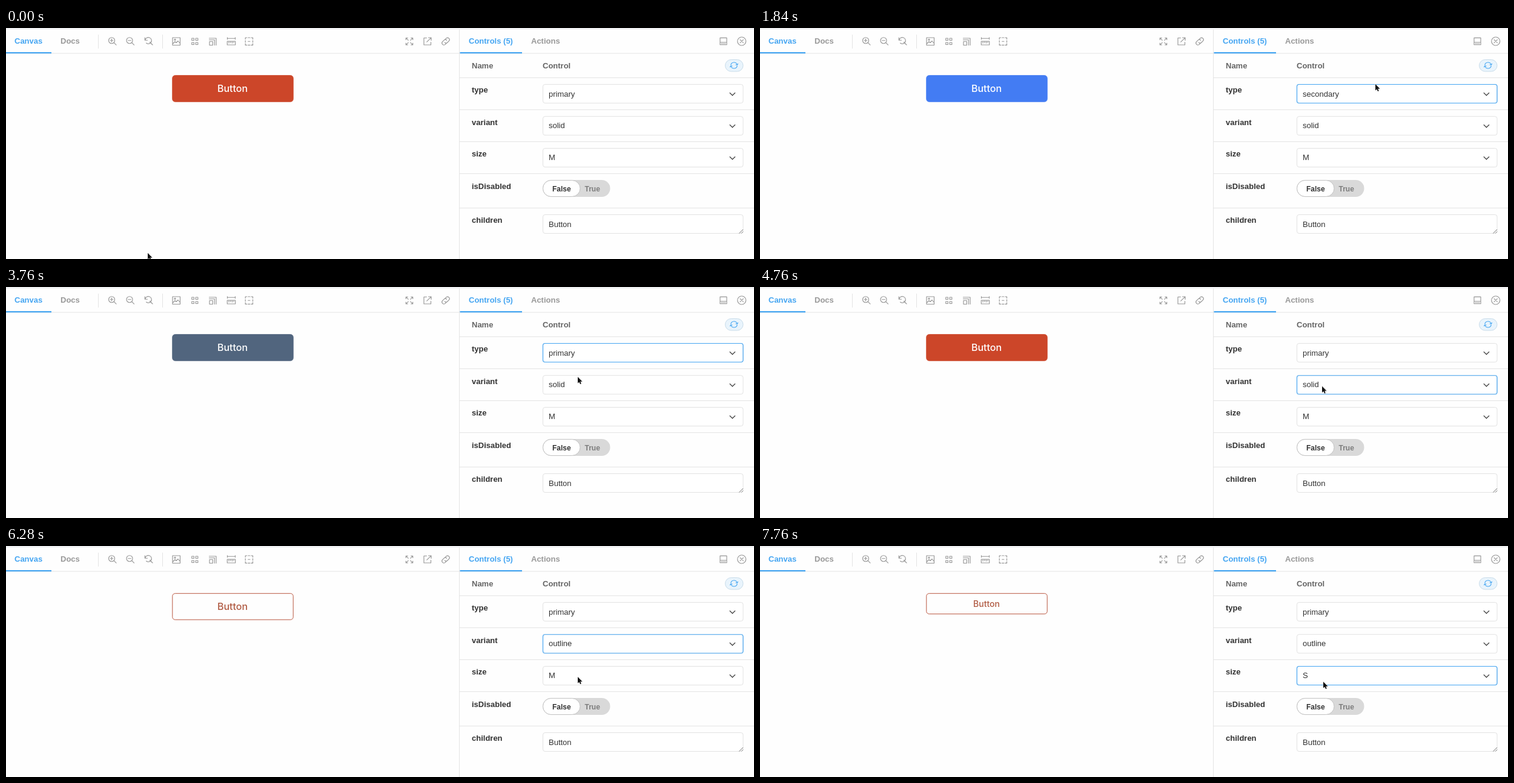
Recreate the animation shown at these times as an HTML page. Size 1235 by 383 pixels, loop 8000 ms.

```html
<!DOCTYPE html>
<html lang="en">
<head>
<meta charset="utf-8">
<title>Button controls</title>
<style>
  html, body { margin: 0; width: 100%; height: 100%; overflow: hidden; background: #fefefe; }
  svg { display: block; width: 1235px; height: 383px; }
  text { font: 13px "Liberation Sans", Arial, sans-serif; fill: #333; }
  .b { font-weight: 700; }
  .tab { font-weight: 700; fill: #999; }
  .on { fill: #46a6f2; }
  .head { font-weight: 700; fill: #666; }
  .line { fill: none; stroke: #e4e4e4; }
  .field { fill: #fff; stroke: #e2e2e2; }
  .icon { fill: none; stroke: #979797; stroke-width: 1.15; stroke-linecap: round; stroke-linejoin: round; }
  .chev { fill: none; stroke: #444; stroke-width: 1.2; }
  .small { font-size: 12px; font-weight: 700; }

  /* one 8 s timeline: 1% = 80 ms */
  .swap, .focus { animation: 8s step-end infinite; opacity: 0; }
  .focus { fill: none; stroke: #46a6f2; stroke-width: 1.2; }
  #primary { animation-name: primary; }
  #secondary { animation-name: secondary; }
  #tertiary { animation-name: tertiary; }
  #solid { animation-name: solid; }
  #outline { animation-name: outline; }
  #m, #bigLabel { animation-name: medium; }
  #s, #smallLabel { animation-name: small; }
  #focusType { animation-name: focusType; }
  #focusVariant { animation-name: focusVariant; }
  #focusSize { animation-name: focusSize; }

  @keyframes primary { 0%, 47% { opacity: 1 } 19.5% { opacity: 0 } 100% { opacity: 1 } }
  @keyframes secondary { 0%, 34.5% { opacity: 0 } 19.5% { opacity: 1 } 100% { opacity: 0 } }
  @keyframes tertiary { 0%, 47% { opacity: 0 } 34.5% { opacity: 1 } 100% { opacity: 0 } }
  @keyframes solid { 0% { opacity: 1 } 71.5%, 100% { opacity: 0 } }
  @keyframes outline { 0% { opacity: 0 } 71.5%, 100% { opacity: 1 } }
  @keyframes medium { 0% { opacity: 1 } 90.5%, 100% { opacity: 0 } }
  @keyframes small { 0% { opacity: 0 } 90.5%, 100% { opacity: 1 } }
  @keyframes focusType { 0%, 59.5% { opacity: 0 } 11% { opacity: 1 } 100% { opacity: 0 } }
  @keyframes focusVariant { 0%, 80.5% { opacity: 0 } 59.5% { opacity: 1 } 100% { opacity: 0 } }
  @keyframes focusSize { 0% { opacity: 0 } 80.5%, 100% { opacity: 1 } }

  #box { animation: fill 8s linear infinite, shrink 8s step-end infinite; }
  @keyframes fill {
    0%, 19.5% { fill: #cc4629; stroke: #cc4629 }
    21.5%, 34.5% { fill: #437cf3; stroke: #437cf3 }
    36.5%, 47% { fill: #50657f; stroke: #50657f }
    49%, 71.5% { fill: #cc4629; stroke: #cc4629 }
    73%, 100% { fill: #fefefe; stroke: #b9563f }
  }
  @keyframes shrink { 0% { height: 43.5px } 90.5%, 100% { height: 34px } }

  .label { font-family: Inter, sans-serif; font-weight: 500; text-anchor: middle; }
  #ink { animation: ink 8s linear infinite; }
  #ink text { fill: inherit; }
  @keyframes ink { 0%, 71.5% { fill: #fff } 73%, 100% { fill: #b05a42 } }

  #cursor { animation: move 8s linear infinite; }
  @keyframes move {
    0%, 1% { transform: translate(234px, 373px); animation-timing-function: ease-in-out }
    7.5%, 19.49% { transform: translate(1034px, 107px) }
    19.5% { transform: translate(1022px, 166px); animation-timing-function: ease-out }
    23%, 24.5% { transform: translate(1016px, 93px) }
    28%, 34.49% { transform: translate(985px, 110px) }
    34.5% { transform: translate(982px, 182px); animation-timing-function: ease-out }
    40%, 46.99% { transform: translate(948px, 112px) }
    47% { transform: translate(944px, 149px); animation-timing-function: ease-out }
    52.5%, 71.49% { transform: translate(928px, 164.5px) }
    71.5%, 74.5% { transform: translate(938px, 211px); animation-timing-function: ease-in-out }
    78.5%, 80.5% { transform: translate(944px, 217px) }
    83.5%, 90.49% { transform: translate(936px, 219px) }
    90.5% { transform: translate(932px, 248px); animation-timing-function: ease-out }
    97%, 100% { transform: translate(930px, 225px) }
  }
</style>
</head>
<body>
<svg viewBox="0 0 1235 383">
  <defs>
    <g id="lens"><circle cx="-1" cy="-1.3" r="5"/><path d="M2.7 2.4 6.5 6.2M-3.4-1.3H1.4"/></g>
    <path id="chevron" class="chev" d="M1194.8 107.3 1199.4 111.8 1204 107.3"/>
    <rect id="frame" x="886.5" y="93.5" width="330.5" height="31" rx="3.5"/>
  </defs>

  <rect width="1235" height="2.5" fill="#f0f1f3"/>
  <path class="line" d="M0 42H1235M748.5 2.5V383M152.5 11V34M258.5 11V34"/>
  <path class="line" d="M749 82.5H1235M749 135.5H1235M749 188.5H1235M749 241.5H1235M749 298.5H1235"/>
  <path fill="#46a6f2" d="M0 40H75V42.3H0ZM749.5 40H852V42.3H749.5Z"/>

  <text class="tab on" x="14" y="26">Canvas</text>
  <text class="tab" x="90" y="26">Docs</text>
  <text class="tab on" x="764" y="26">Controls (5)</text>
  <text class="tab" x="867" y="26">Actions</text>

  <g class="icon">
    <use href="#lens" x="175.5" y="22"/><path d="M174.5 18.3V23.1"/>
    <use href="#lens" x="205" y="22"/>
    <path d="M229.3 16V20.2H233.5M229.8 19.8A5.3 5.3 0 1 1 231.6 25M237.5 23.5 242 28"/>
    <path d="M275 16H287.5V28.5H275ZM275.5 26 279 22.5 281 24.5 284 21.5 287 25"/><circle cx="279" cy="19.4" r="1.1"/>
    <path d="M306.8 17H310.3V20.5H306.8ZM313.3 17H316.8V20.5H313.3ZM306.8 24H310.3V27.5H306.8ZM313.3 24H316.8V27.5H313.3Z"/>
    <path d="M335.5 17H347V28.5M335.5 19.7H344.3V28.5M336 22.5H341.3V28.5H336Z"/>
    <path d="M365.5 17.2H378.5M365.5 15.7V18.7M378.5 15.7V18.7M365.3 22H378.7V28H365.3ZM368 22.5V25M370.7 22.5V24.3M373.4 22.5V25M376 22.5V24.3"/>
    <path d="M395.2 18.5V16H397.7M399.7 16H402.7M404.7 16H407.5V18.5M407.5 20.7V23.7M407.5 25.8V28.4H404.7M402.7 28.4H399.7M397.7 28.4H395.2V25.8M395.2 23.7V20.7M399.7 22.2H402.8"/>
    <path d="M660.3 19.5V16.5H663.3M660.5 16.7 664.2 20.4M668.7 16.5H671.7V19.5M671.5 16.7 667.8 20.4M660.3 25V28H663.3M660.5 27.8 664.2 24.1M668.7 28H671.7V25M671.5 27.8 667.8 24.1"/>
    <path d="M694.5 16.5H690V28H701.5V23.5M697.5 16H702V20.5M701.7 16.3 694.8 23.2"/>
    <path d="M725 18.8 727 16.9A3.2 3.2 0 0 1 731.5 21.4L728.9 24A3.2 3.2 0 0 1 724.4 24M727 25.5 725 27.4A3.2 3.2 0 0 1 720.5 22.9L723.1 20.3A3.2 3.2 0 0 1 727.6 20.3"/>
    <path d="M1179 16.3H1190V27.7H1179ZM1179 23.7H1190M1181.3 25.8H1182.3M1184 25.8H1185M1186.7 25.8H1187.7"/>
    <circle cx="1214.7" cy="22" r="7"/><path d="M1212 19.3 1217.4 24.7M1217.4 19.3 1212 24.7"/>
  </g>

  <text class="head" x="769" y="66.5">Name</text>
  <text class="head" x="886" y="66.5">Control</text>
  <rect x="1187.5" y="52.5" width="29.5" height="19.5" rx="9.75" fill="#e9f4fc" stroke="#c9dcea"/>
  <path class="icon" style="stroke:#46a6f2" d="M1196.8 61.2A5.3 5.3 0 0 1 1207 60.6M1207.2 62.8A5.3 5.3 0 0 1 1197 63.4M1205 61 1207.2 61.2 1208.5 59.4M1199 63 1196.8 62.8 1195.5 64.6"/>

  <text class="b" x="769" y="107">type</text>
  <text class="b" x="769" y="160.5">variant</text>
  <text class="b" x="769" y="213">size</text>
  <text class="b" x="769" y="266.5">isDisabled</text>
  <text class="b" x="769" y="323">children</text>

  <use href="#frame" class="field"/><use href="#chevron"/>
  <use href="#frame" class="field" y="53.2"/><use href="#chevron" y="53"/>
  <use href="#frame" class="field" y="106"/><use href="#chevron" y="106"/>
  <use href="#frame" class="field" y="216"/>
  <use href="#frame" class="focus" id="focusType"/>
  <use href="#frame" class="focus" id="focusVariant" y="53.2"/>
  <use href="#frame" class="focus" id="focusSize" y="106"/>

  <text class="swap" id="primary" x="896" y="113.5">primary</text>
  <text class="swap" id="secondary" x="896" y="113.5">secondary</text>
  <text class="swap" id="tertiary" x="896" y="113.5">tertiary</text>
  <text class="swap" id="solid" x="896" y="166">solid</text>
  <text class="swap" id="outline" x="896" y="166">outline</text>
  <text class="swap" id="m" x="896" y="219">M</text>
  <text class="swap" id="s" x="896" y="219">S</text>
  <text x="896" y="329.5">Button</text>
  <path d="M1210.5 340.5 1217 334M1214 340.5 1217 337.5" stroke="#777" fill="none"/>

  <rect x="886" y="252" width="111.5" height="28" rx="14" fill="#d9d9d9"/>
  <rect x="886.5" y="252.5" width="61.5" height="27" rx="13.5" fill="#fff" stroke="#c2c2c2"/>
  <text class="small" x="902" y="270.5">False</text>
  <text class="small" x="955.5" y="270.5" style="fill:#7d7d7d">True</text>

  <rect id="box" x="274.8" y="78.7" width="199.4" height="43.5" rx="4.5"/>
  <g id="ink">
    <text class="label swap" id="bigLabel" x="374" y="106" style="font-size:16px">Button</text>
    <text class="label swap" id="smallLabel" x="374" y="101" style="font-size:14px">Button</text>
  </g>

  <path id="cursor" d="M0 0V10.6L2.4 8.4 4 12 5.8 11.2 4.2 7.7H7.6Z" fill="#111" stroke="#fff" stroke-width=".8" paint-order="stroke"/>
</svg>
</body>
</html>
```
